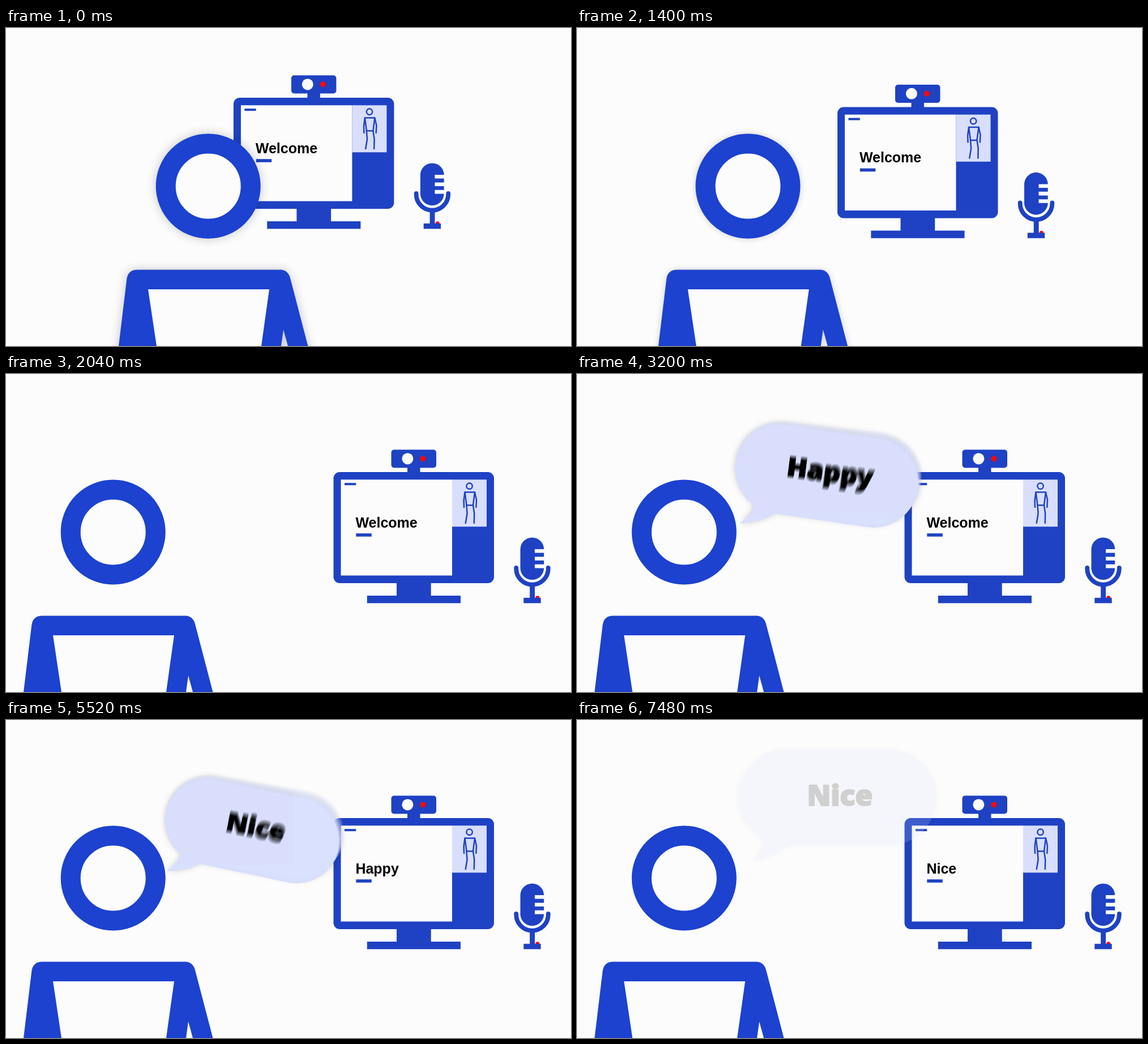
Recreate the animation shown at these times as an HTML page. Size 998x561 px, loop 8520 ms.

```html
<!DOCTYPE html>
<html lang="en">
<head>
<meta charset="utf-8">
<title>Live captions</title>
<style>
  html, body { margin: 0; width: 100%; height: 100%; overflow: hidden; background: #fcfcfc; }
  svg { display: block; width: 100vw; height: 100vh; }
  .caption { font: bold 25px "Liberation Sans", Arial, sans-serif; }
  .speech {
    font: 800 50px "Open Sans", "Noto Sans", sans-serif;
    text-anchor: middle; stroke: #000; stroke-width: 2; stroke-linejoin: round;
  }
</style>
</head>
<body>
<svg viewBox="0 0 998 561">
  <defs>
    <filter id="soft" filterUnits="userSpaceOnUse" x="-100" y="0" width="1200" height="700">
      <feGaussianBlur id="softBlur" stdDeviation="9"/>
    </filter>
    <filter id="glow" filterUnits="userSpaceOnUse" x="200" y="-50" width="520" height="400">
      <feGaussianBlur stdDeviation="6"/>
    </filter>
    <g id="silhouette">
      <circle cx="189.2" cy="279" r="75" fill="none" stroke="currentColor" stroke-width="35"/>
      <path fill="currentColor" d="M26.3 600 L45.3 443 Q47.5 426.5 64 426.5 H317 Q331 427 334.5 443
        L375.6 600 H340.7 L322 532 L312.6 600 Z"/>
    </g>
    <path id="balloon" d="M370 52 H550.5 A84.7 84.7 0 0 1 550.5 221.4 H372 Q346 244 309 249
      Q325 236 331 212 A84.7 84.7 0 0 1 370 52 Z"/>
  </defs>
  <rect width="998" height="561" fill="#fcfcfc"/>

  <g id="desk" fill="#1e42c3">
    <rect x="680.5" y="133.5" width="79.5" height="32" rx="5"/>
    <rect x="709" y="165" width="22.5" height="10"/>
    <circle cx="709.4" cy="149.4" r="10" fill="#fcfcfc"/>
    <circle cx="736.3" cy="149.4" r="5" fill="#f80808"/>
    <rect x="578.5" y="173" width="283.5" height="196" rx="11"/>
    <rect x="591.5" y="186.3" width="196.5" height="169.2" fill="#fcfcfc"/>
    <rect x="788" y="186.3" width="61" height="83" fill="#d8defc"/>
    <rect x="690" y="368" width="60.7" height="24"/>
    <rect x="637.8" y="391" width="165.2" height="13.3"/>
    <rect x="598" y="192.2" width="20.2" height="4"/>
    <rect x="618.3" y="281.2" width="27.5" height="5.6"/>
    <g fill="none" stroke="#1e42c3" stroke-width="2.5" stroke-linejoin="round" stroke-linecap="round">
      <circle cx="818.6" cy="197.8" r="5.2"/>
      <path d="M809 235 L808.6 223 L810.5 208.5 H828 L831 222 L830.3 235"/>
      <path d="M810.5 208.5 L813.5 231.5 H825 L828 208.5"/>
      <path d="M813.5 231.5 L814.6 246 L811.8 263 M825 231.5 L827.2 246 L826.8 263"/>
    </g>
    <text id="caption" class="caption" x="617.4" y="270.6" fill="#000"></text>

    <rect x="908.5" y="288.4" width="41.7" height="74.6" rx="20.8"/>
    <path fill="#fcfcfc" d="M934 309 h17 v6.6 h-17 Z m0 13.4 h17 v6.6 h-17 Z m0 13.4 h17 v6.6 h-17 Z"/>
    <path d="M901.2 342 V343.3 A28.3 28.3 0 0 0 957.8 343.3 V342" fill="none"
      stroke="#1e42c3" stroke-width="7.8" stroke-linecap="round"/>
    <circle cx="938.8" cy="394.8" r="3.6" fill="#f80808"/>
    <rect x="925.2" y="373" width="8.9" height="23"/>
    <rect x="914.3" y="394.8" width="30.4" height="9.5"/>
  </g>

  <g id="person">
    <use id="personShadow" href="#silhouette" color="#000" filter="url(#soft)"/>
    <circle cx="189.2" cy="279" r="60" fill="#fcfcfc"/>
    <use href="#silhouette" color="#1c42cf"/>
    <path d="M83 461 H297 L277.5 600 H103.8 Z" fill="#fcfcfc"/>
  </g>

  <g id="bubble">
    <use id="bubbleShadow" href="#balloon" opacity=".2" filter="url(#glow)"/>
  </g>
</svg>

<script>
const LOOP = 8520, STEP = 40, SAMPLES = 7, SHUTTER = 20;
const $ = id => document.getElementById(id);
const clamp = x => Math.min(1, Math.max(0, x));
const set = (el, name, value) => el.setAttribute(name, value);

const captions = [
  { word: "Nice", at: 6040, keys: [6160, 6280, 6400, 6560] },
  { word: "Happy", at: 3640, keys: [3720, 3840, 3960, 4120, 4240] },
];
const bubbles = [
  { word: "Happy", from: 2882, out: 4760 },
  { word: "Nice", from: 5236, out: 7280 },
];

function add(parent, tag, attrs) {
  const el = document.createElementNS("http://www.w3.org/2000/svg", tag);
  for (const name in attrs) set(el, name, attrs[name]);
  return parent.appendChild(el);
}

// Stacked copies with opacity 1, 1/2, 1/3 ... average into motion blur.
const layers = Array.from({ length: SAMPLES }, (_, i) => {
  const g = add($("bubble"), "g", { opacity: 1 / (i + 1) });
  add(g, "use", { href: "#balloon", fill: "#d8defc" });
  return { g, text: add(g, "text", { class: "speech", x: 464.5, y: 150.5 }) };
});

// The bubble swings up from the mouth, hinged at the tip of its tail.
function pose(ms) {
  const w = clamp(ms / 465);
  const u = w + 0.3 * w * (1 - w);
  const scale = 1 - (1 - u) ** 2;
  const left = 1 - u * u;
  return `translate(${309 - 46 * left} ${249 + 30 * left}) rotate(${38 * left * left}) ` +
    `scale(${scale}) translate(-309 -249)`;
}

function drawBubble(t) {
  const b = bubbles.find(b => t >= b.from && t < b.out + 240);
  set($("bubble"), "display", b ? "inline" : "none");
  if (!b) return;
  const age = t - b.from;
  const moving = age < 475;
  set($("bubble"), "opacity", 1 - clamp((t - b.out) / 240));
  set($("bubbleShadow"), "transform", pose(age));
  layers.forEach(({ g, text }, i) => {
    set(g, "display", moving || i === 0 ? "inline" : "none");
    set(g, "transform", pose(moving ? age + SHUTTER * (i / (SAMPLES - 1) - 0.5) : age));
    text.textContent = b.word;
  });
}

function captionAt(t) {
  const c = captions.find(c => t >= c.at);
  return c ? c.word.slice(0, c.keys.filter(k => t >= k).length) : "Welcome";
}

function draw(t) {
  const p = clamp((t - 1016) / 1000);
  const left = 1 - p * p * (3 - 2 * p);
  set($("person"), "transform", `translate(${168 * left} 0)`);
  set($("desk"), "transform", `translate(${-176.6 * left} ${-50 * left})`);
  set($("softBlur"), "stdDeviation", 9 * left + 0.01);
  set($("personShadow"), "opacity", 0.22 * Math.sqrt(left));
  $("caption").textContent = captionAt(t);
  drawBubble(t);
}

const start = performance.now();
function tick() {
  const t = (performance.now() - start) % LOOP;
  draw(Math.floor((t + 4) / STEP) * STEP % LOOP);
  requestAnimationFrame(tick);
}
tick();
</script>
</body>
</html>
```
